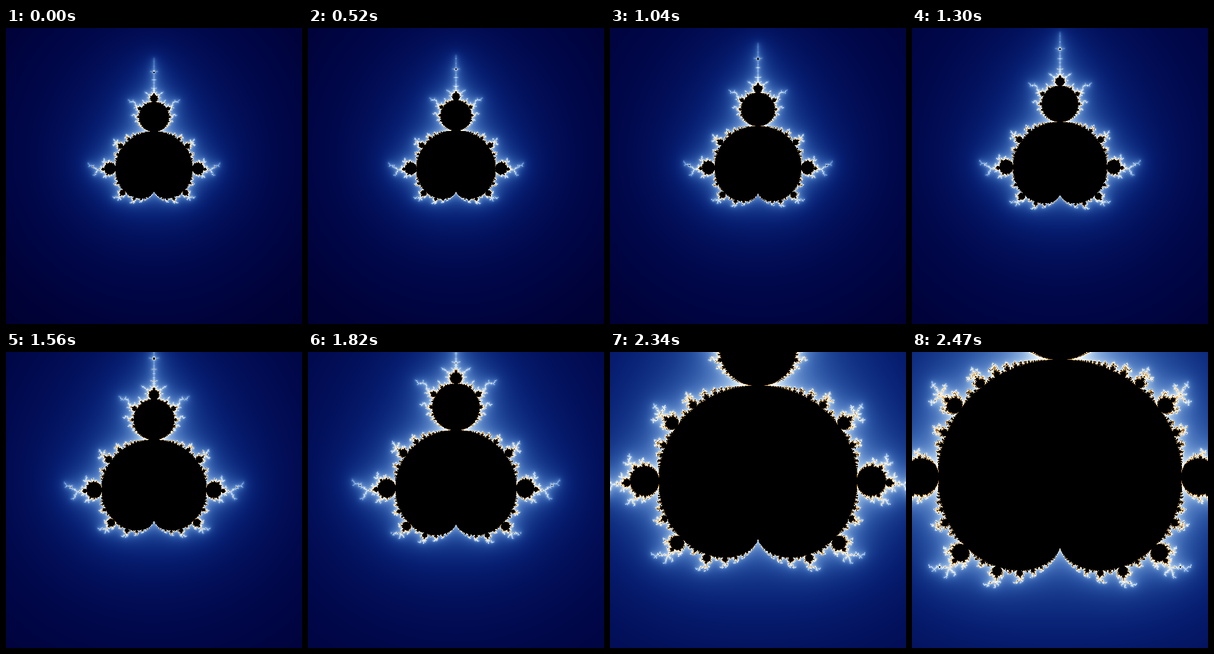
These frames come from a looping animation (500x500 px, 2600 ms). An HTML page with a canvas:

```html
<!DOCTYPE html>
<html lang="en">
<head>
<meta charset="utf-8">
<title>Mandelbrot zoom</title>
<style>
  html, body { margin: 0; width: 100%; height: 100%; overflow: hidden; background: #000030; }
  canvas { display: block; width: 500px; height: 500px; }
</style>
</head>
<body>
<canvas id="view" width="500" height="500"></canvas>
<script>
const SIZE = 500, STEPS = 20, STEP_MS = 130, MAX_ITER = 100, BAILOUT = 1e4;
const ctx = document.getElementById('view').getContext('2d');

// Smooth escape value -> colour
const STOPS = [
  [0.5, 0, 0, 48], [1.1, 0, 5, 68], [2, 2, 15, 89], [3, 6, 28, 110],
  [4, 14, 44, 128], [6, 38, 78, 158], [8, 65, 108, 182], [12, 115, 155, 212],
  [18, 180, 208, 238], [26, 240, 246, 250], [38, 255, 238, 205],
  [55, 250, 185, 80], [75, 150, 90, 20], [95, 20, 8, 0]
];
const LUT_RES = 64;
const lut = Array.from({ length: MAX_ITER * LUT_RES }, (_, i) => colour(i / LUT_RES));

function colour(v) {
  const last = STOPS.length - 1;
  if (v <= STOPS[0][0]) return STOPS[0].slice(1);
  if (v >= STOPS[last][0]) return STOPS[last].slice(1);
  const k = STOPS.findIndex(s => s[0] > v);
  const a = STOPS[k - 1], b = STOPS[k], t = (v - a[0]) / (b[0] - a[0]);
  return [1, 2, 3].map(c => a[c] + (b[c] - a[c]) * t);
}

function inSet(re, im) {
  const i2 = im * im, x = re - 0.25, q = x * x + i2;
  return q * (q + x) <= 0.25 * i2 || (re + 1) * (re + 1) + i2 <= 0.0625;
}

// Returns -1 for points that never escape
function escape(re, im) {
  if (inSet(re, im)) return -1;
  let x = re, y = im, n = 0, x2 = x * x, y2 = y * y;
  while (x2 + y2 < BAILOUT) {
    if (n >= MAX_ITER) return -1;
    y = 2 * x * y + im;
    x = x2 - y2 + re;
    x2 = x * x;
    y2 = y * y;
    n++;
  }
  return n + 1 - Math.log2(Math.log(x2 + y2) / 2);
}

function render(step) {
  const half = 2.5 - 0.005 * step * (step - 1);
  const axis = i => half * (2 * i / (SIZE - 1) - 1);
  const img = ctx.createImageData(SIZE, SIZE), d = img.data;
  for (let py = 0; py < SIZE; py++) {
    const re = axis(py);
    for (let px = 0; px < SIZE / 2; px++) {
      const v = escape(re, axis(px));
      const c = v < 0 ? [0, 0, 0] : lut[Math.min(lut.length - 1, Math.max(0, v * LUT_RES | 0))];
      for (const col of [px, SIZE - 1 - px]) {
        const o = (py * SIZE + col) * 4;
        d[o] = c[0];
        d[o + 1] = c[1];
        d[o + 2] = c[2];
        d[o + 3] = 255;
      }
    }
  }
  return img;
}

const cache = [];
const start = performance.now();
let shown = -1;

function tick() {
  const step = Math.floor((performance.now() - start) / STEP_MS) % STEPS;
  if (step !== shown) {
    ctx.putImageData(cache[step] || (cache[step] = render(step)), 0, 0);
    shown = step;
  }
  requestAnimationFrame(tick);
}
tick();
</script>
</body>
</html>
```
